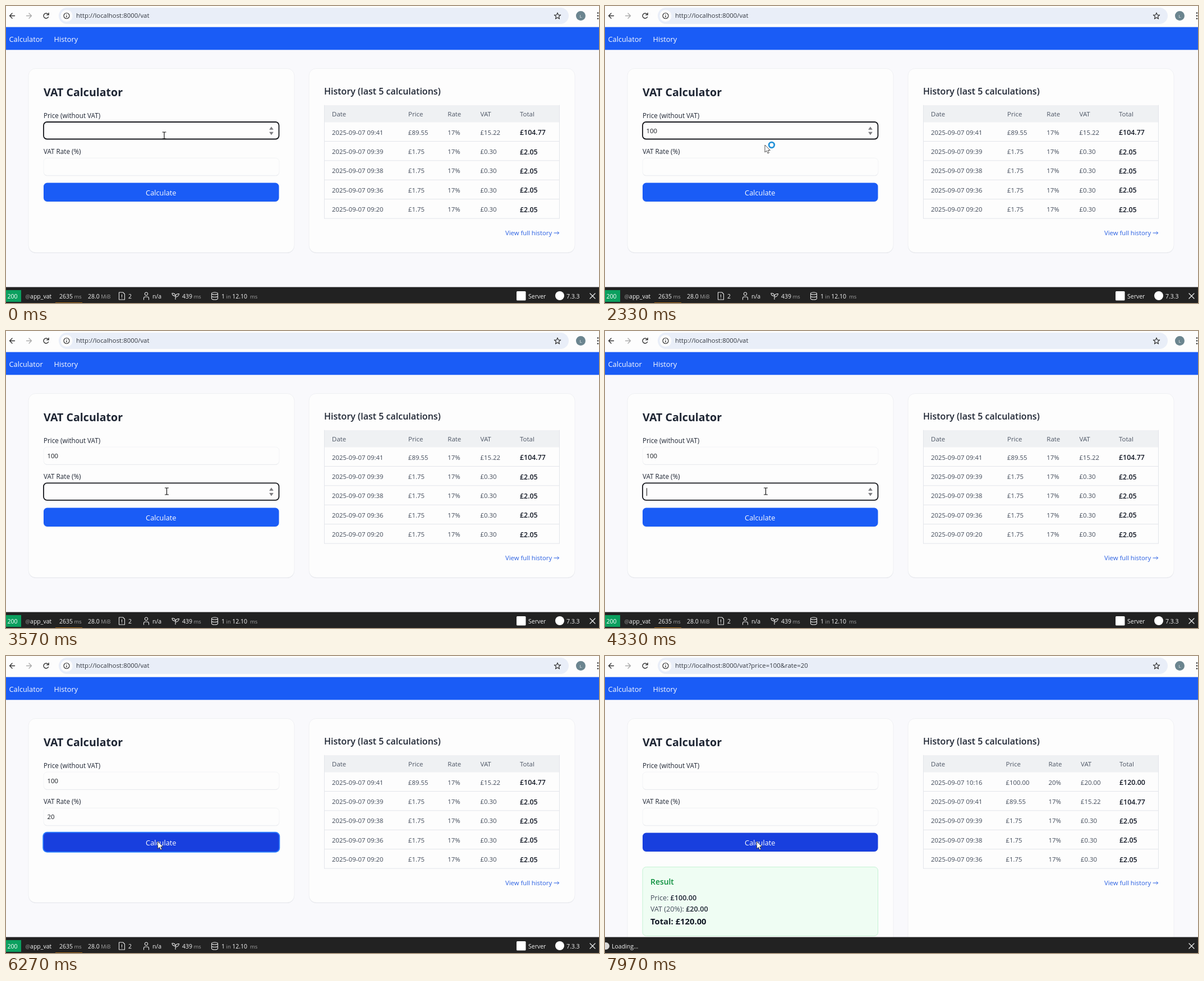
Write an HTML page that moves like this. It is 1057 px wide and 530 px high and loops after 8 s.

```html
<!DOCTYPE html>
<html lang="en">
<head>
<meta charset="utf-8">
<title>VAT Calculator</title>
<style>
html, body { margin: 0; width: 100%; height: 100%; overflow: hidden; background: #f9f9fc; }
svg { display: block; }
text { font-family: "Open Sans", "Noto Sans", sans-serif; white-space: pre; }
.line { fill: none; stroke-linecap: round; stroke-linejoin: round; }
</style>
</head>
<body>
<svg id="stage" width="1057" height="530" viewBox="0 0 1057 530"></svg>
<script>
const LOOP = 8000;
const PRESS = 6200, SUBMIT = 6560, BAR = 7070, RESULT = 7600;
const RATE_FOCUS = 2900;
const BLUE = '#1a5cf6', HOVER = '#183fde', INK = '#1e2533', SLATE = '#414a59', WHITE = '#fdfdfd';
const stage = document.getElementById('stage');

// [time, x, y] stops of the mouse pointer
const pointerPath = [
  [0, 282, 231], [1950, 282, 231], [2250, 285, 248], [2450, 285, 248], [2800, 286.5, 286],
  [5000, 286.5, 286], [5300, 282, 298], [5750, 270.5, 331], [LOOP, 270.5, 331]
];
const priceKeys = [[1150, '1'], [1450, '10'], [1700, '100']];
const rateKeys = [[4650, '2'], [4950, '20']];
const history = [
  ['2025-09-07 10:16', '£100.00', '20%', '£20.00', '£120.00'],
  ['2025-09-07 09:41', '£89.55', '17%', '£15.22', '£104.77'],
  ...['09:39', '09:38', '09:36', '09:20'].map(h => ['2025-09-07 ' + h, '£1.75', '17%', '£0.30', '£2.05'])
];

const clamp = v => Math.min(1, Math.max(0, v));
const easeOut = p => 1 - (1 - clamp(p)) ** 1.8;
const smooth = p => p * p * (3 - 2 * p);

const text = (x, y, size, str, fill = INK, weight = 400, extra = '') =>
  `<text x="${x}" y="${y}" font-size="${size}" fill="${fill}" font-weight="${weight}" ${extra}>${str}</text>`;
const rect = (x, y, w, h, fill, r = 0, extra = '') =>
  `<rect x="${x}" y="${y}" width="${w}" height="${h}" rx="${r}" fill="${fill}" ${extra}/>`;
const circle = (x, y, r, fill, extra = '') => `<circle cx="${x}" cy="${y}" r="${r}" fill="${fill}" ${extra}/>`;
const line = (x, y, d, color, width = 1.2) =>
  `<path class="line" transform="translate(${x} ${y})" d="${d}" stroke="${color}" stroke-width="${width}"/>`;
const shape = (x, y, d, fill, extra = '') =>
  `<path transform="translate(${x} ${y})" d="${d}" fill="${fill}" ${extra}/>`;

const typed = (keys, t) => keys.reduce((value, [at, str]) => t >= at ? str : value, '');

function pointerAt(t) {
  const i = pointerPath.findIndex(stop => stop[0] > t);
  const [t0, x0, y0] = pointerPath[i - 1], [t1, x1, y1] = pointerPath[i];
  const p = smooth((t - t0) / (t1 - t0));
  return [x0 + (x1 - x0) * p, y0 + (y1 - y0) * p];
}

function caretOn(t) {
  const resets = [-700, ...priceKeys.map(k => k[0]), RATE_FOCUS, ...rateKeys.map(k => k[0])];
  const last = resets.filter(at => at <= t).pop();
  return (t - last) % 1000 < 500;
}

function browserBar(done) {
  const star = Array.from({ length: 10 }, (_, i) => {
    const r = i % 2 ? 2.6 : 6, a = i * Math.PI / 5;
    return `${(r * Math.sin(a)).toFixed(1)} ${(-r * Math.cos(a)).toFixed(1)}`;
  }).join('L');
  return rect(0, 0, 1057, 38, WHITE)
    + rect(94, 3, 909, 29, '#e9eef8', 14.5)
    + line(11, 17.5, 'M4.5 0H-4.5M0-4.5L-4.5 0L0 4.5', '#333', 1.4)
    + line(41, 17.5, 'M-4.5 0H4.5M0-4.5L4.5 0L0 4.5', '#aaa', 1.4)
    + line(71.5, 17.5, 'M4 2A4.5 4.5 0 1 1 3.4-3M4.6-5V-1.6H1.2', '#333', 1.4)
    + circle(108, 17.5, 10.5, WHITE)
    + circle(108, 17.5, 5, 'none', 'stroke="#333" stroke-width="1.2"')
    + line(108, 17.5, 'M0 0V2.4M0-2.4V-2.3', '#333', 1.3)
    + text(125, 21.3, 11.4, 'http://localhost:8000/vat' + (done ? '?price=100&amp;rate=20' : ''), '#333840')
    + line(983, 18, `M${star}Z`, '#333', 1.2)
    + circle(1024.5, 17.5, 8.5, '#6b858f')
    + text(1024.5, 20.5, 8, 'L', '#e8eef0', 400, 'text-anchor="middle"')
    + [12.5, 17.5, 22.5].map(y => circle(1055, y, 1.3, '#333')).join('');
}

const card = (x, height) =>
  rect(x, 112.5, 474, height, '#e4e6ea', 13) + rect(x, 111.5, 474, height, WHITE, 13, 'stroke="#eceef1" stroke-width=".8"');

function field(y, label, value, focused, caret) {
  let out = text(67, y - 7, 11.7, label, INK, 500);
  if (!focused) {
    out += rect(67, y + 1, 420, 31, '#e6e8ec', 6.5)
      + rect(67, y, 420, 31, WHITE, 6.5, 'stroke="#f0f1f4" stroke-width=".8"');
  } else {
    out += rect(67, y, 419.5, 30.5, WHITE, 6, 'stroke="#15171c" stroke-width="1.8"')
      + shape(473, y + 11, 'M-3.8 2.8L0-2.8L3.8 2.8Z', '#7c7c80')
      + shape(473, y + 20.5, 'M-3.8-2.8L0 2.8L3.8-2.8Z', '#7c7c80');
    if (caret) out += rect(74 + value.length * 6.45, y + 9, 1, 14, '#111');
  }
  return out + text(73.5, y + 20, 11.4, value, '#15191f');
}

function form(t, done, hover) {
  const rateFocused = t >= RATE_FOCUS && t < PRESS;
  const ring = t >= PRESS && t < SUBMIT;
  return card(40, done ? 440 : 328.5)
    + text(67, 161, 19.6, 'VAT Calculator', INK, 700)
    + field(207, 'Price (without VAT)', done ? '' : typed(priceKeys, t), t < RATE_FOCUS, caretOn(t))
    + field(271.3, 'VAT Rate (%)', done ? '' : typed(rateKeys, t), rateFocused, caretOn(t))
    + rect(67, 316.5, 419.5, 33, '#d9dce4', 6.5)
    + (ring ? rect(65.3, 313.8, 423, 36.9, '#2b7fff', 8) : '')
    + rect(67, 315.5, 419.5, 33.5, hover ? HOVER : BLUE, 6.5)
    + text(276.3, 337.5, 12.8, 'Calculate', WHITE, 400, 'text-anchor="middle"');
}

function resultPanel() {
  const row = (y, label, amount) =>
    text(81, y, 12.6, `${label} <tspan font-weight="600" fill="${INK}">${amount}</tspan>`, SLATE);
  return rect(67, 376.5, 419.5, 123, '#effdf3', 6.5, 'stroke="#c4f3d4"')
    + text(81, 408, 13.9, 'Result', '#0a8f3c', 600)
    + row(436, 'Price:', '£100.00')
    + row(456.3, 'VAT (20%):', '£20.00')
    + text(81, 479, 14.8, 'Total: £120.00', '#101623', 700);
}

function historyCard(done) {
  const cols = done ? [581, 714.5, 790.5, 848, 917] : [581, 717, 787.3, 845.5, 916];
  const rows = history.slice(done ? 0 : 1).slice(0, 5);
  const border = '#e3e5ea';
  return card(540, done ? 440 : 328.5)
    + text(567, 157.5, 16.05, 'History (last 5 calculations)', INK, 600)
    + rect(567, 177, 420, 30.5, '#eff1f3')
    + ['Date', 'Price', 'Rate', 'VAT', 'Total'].map((h, i) => text(cols[i], 197.3, 11.5, h, '#4d5665', 500)).join('')
    + rows.map((cells, r) => {
      const y = 207.3 + r * 34.4;
      return line(567.5, y + 34.2, 'M0 0H419', border, 1)
        + cells.map((c, i) => i < 4
          ? text(cols[i], y + 22.3, 11.4, c, SLATE)
          : text(cols[i], y + 22.8, 12.4, c, '#101623', 600)).join('');
    }).join('')
    + line(567.5, 177, 'M0 0V202M419 0V202', border, 1)
    + text(890, 409, 11.3, 'View full history', '#2a60e2')
    + line(977, 405, 'M0 0H8.5M6-2.5L8.5 0L6 2.5', '#2a60e2', 1);
}

function toolbar(t, done) {
  const close = line(1045.5, 517.5, 'M-4.5-4.5L4.5 4.5M4.5-4.5L-4.5 4.5', '#eee', 1.3);
  const label = (x, str) => text(x, 522, 10.5, str, '#f5f5f5');
  const unit = str => `<tspan font-size="9.5" fill="#a0a0a0">${str}</tspan>`;
  const icon = (x, d) => line(x, 517.5, d, '#e4e4e4', 1.1);
  const base = rect(0, 501.6, 1057, 28.4, '#222');
  if (done) return base + circle(1.5, 517.5, 6.5, '#d8d8d8') + label(12, 'Loading...') + close;

  const ajax = t >= SUBMIT, shift = ajax ? 43 : 0;
  return base
    + rect(0, 507, 27, 21, '#0ba05f')
    + text(11.5, 522, 10.5, '200', '#fff', 400, 'text-anchor="middle"')
    + label(34.5, unit('@') + 'app_vat')
    + label(95, '2635' + unit(' ms'))
    + rect(88, 529, 48, 1, '#a46a1f')
    + label(146, '28.0' + unit(' MiB'))
    + (ajax ? rect(190, 502, 43, 28, '#444')
      + icon(206, 'M-3.5-6V6M-6 3.5L-3.5 6L-1 3.5M3.5 6V-6M1-3.5L3.5-6L6-3.5') + label(218, '1') : '')
    + `<g transform="translate(${shift} 0)">`
    + icon(206.5, 'M-5-6.5H2L5-3.5V6.5H-5ZM0-2.5V1.5M0 3.5V3.6') + label(218, '2')
    + icon(250, 'M-4.5 6.5V4Q-4.5 1.5-2 1.5H2Q4.5 1.5 4.5 4V6.5M0-6.5A2.7 2.7 0 1 1 0-1.1A2.7 2.7 0 1 1 0-6.5') + label(261, 'n/a')
    + icon(302, 'M0 6V0Q0-5-6-5Q-6 0 0 0Q1-4 6.5-4Q6 1 0 2') + label(314, '439' + unit(' ms'))
    + icon(372, 'M-5.5-4.5A5.5 2 0 1 1 5.5-4.5A5.5 2 0 1 1-5.5-4.5V4.5A5.5 2 0 0 0 5.5 4.5V-4.5M-5.5 0A5.5 2 0 0 0 5.5 0')
    + label(384, '1' + unit(' in ') + '12.10' + unit('  ms'))
    + '</g>'
    + rect(910, 509, 16.5, 16.5, '#fff', 1.5) + label(931, 'Server')
    + circle(987, 517, 8, '#fff') + label(999, '7.3.3')
    + close;
}

function progressBar(t) {
  if (t < BAR) return '';
  const share = 0.1 * easeOut((t - BAR) / 300) + 0.9 * easeOut((t - RESULT) / 300);
  const opacity = 1 - clamp((t - RESULT - 150) / 150);
  return rect(0, 37.6, 1057 * share, 2.5, '#0b83ff', 0, `opacity="${opacity}"`);
}

function pointer(x, y) {
  const inField = (y > 207 && y < 238) || (y > 271 && y < 302);
  if (inField) return line(x, y, 'M-3-6H-1Q0-6 0-5V5Q0 6-1 6H-3M3-6H1Q0-6 0-5M0 5Q0 6 1 6H3', '#111', 1.2);
  const arrow = shape(x, y, 'M0 0V13L3 10.3L5.2 15L7.4 14L5.3 9.5H9.4Z',
    '#fff', 'stroke="#222" stroke-width=".8" stroke-linejoin="round"');
  const busy = y < 271 ? circle(x + 12, y, 4.8, '#fff', 'stroke="#2492d8" stroke-width="2.8"') : '';
  return arrow + busy;
}

let shown = '';
function frame(now) {
  const t = now % LOOP;
  const done = t >= RESULT;
  const [x, y] = pointerAt(t);
  const markup = rect(0, 0, 1057, 530, '#f9f9fc')
    + browserBar(done)
    + rect(0, 37.6, 1057, 40.7, BLUE)
    + text(5.5, 63.5, 12.8, 'Calculator', WHITE)
    + text(85.5, 63.5, 12.8, 'History', WHITE)
    + form(t, done, y > 315.5)
    + historyCard(done)
    + (done ? resultPanel() : '')
    + toolbar(t, done)
    + progressBar(t)
    + pointer(x, y);
  if (markup !== shown) stage.innerHTML = shown = markup;
  requestAnimationFrame(frame);
}
requestAnimationFrame(frame);
</script>
</body>
</html>
```
